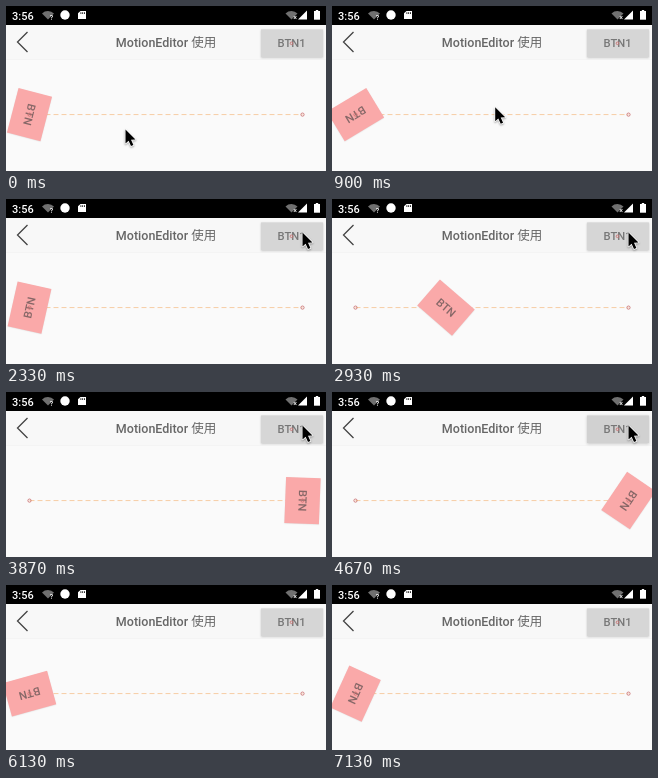
Recreate the animation shown at these times as an HTML page with a canvas. Size 320 px wide and 165 px high, loop 7.16 s.

```html
<!DOCTYPE html>
<html lang="zh">
<head>
<meta charset="utf-8">
<title>MotionEditor 使用</title>
<style>
html, body { margin: 0; width: 100%; height: 100%; overflow: hidden; background: #fafafa; }
canvas { display: block; width: 320px; height: 165px; }
</style>
</head>
<body>
<canvas id="stage"></canvas>
<script>
const LOOP = 7160, LEFT = 23.5, RIGHT = 296.5, TRACK = 108.6;
const GO = 2560, BACK = 4740, TRAVEL = 950;
const FONT = 'Roboto, "Noto Sans CJK SC", "Noto Sans CJK", sans-serif';
const canvas = document.getElementById('stage');
const c = canvas.getContext('2d');
const dpr = window.devicePixelRatio || 1;
canvas.width = 320 * dpr;
canvas.height = 165 * dpr;

const ramp = (t, start, length) => Math.max(0, Math.min(1, (t - start) / length));
const smooth = v => (1 - Math.cos(Math.PI * v)) / 2;

function rect(x, y, w, h, fill) {
  c.fillStyle = fill;
  c.fillRect(x, y, w, h);
}

function box(x, y, w, h, fill, blur, alpha) {
  c.save();
  c.shadowColor = `rgba(0,0,0,${alpha})`;
  c.shadowBlur = blur * dpr;
  c.shadowOffsetY = 0.5 * dpr;
  rect(x, y, w, h, fill);
  c.restore();
}

function polygon(points, fill) {
  c.beginPath();
  points.forEach(([x, y]) => c.lineTo(x, y));
  c.closePath();
  c.fillStyle = fill;
  c.fill();
}

function line(points, color, width) {
  c.beginPath();
  points.forEach(([x, y]) => c.lineTo(x, y));
  c.strokeStyle = color;
  c.lineWidth = width;
  c.stroke();
}

function text(str, x, y, size, color, align = 'center') {
  c.font = `500 ${size}px ${FONT}`;
  c.textAlign = align;
  c.fillStyle = color;
  c.fillText(str, x, y);
}

function ring(x, y, r) {
  c.beginPath();
  c.arc(x, y, r, 0, Math.PI * 2);
  c.strokeStyle = '#cc7474';
  c.lineWidth = 0.9;
  c.stroke();
}

function wifi(x, mark) {
  c.beginPath();
  c.moveTo(x, 13.5);
  c.arc(x, 13.5, 8.5, -Math.PI * 0.75, -Math.PI * 0.25);
  c.fillStyle = '#707070';
  c.fill();
  text(mark, x + 3.5, 13.7, 7, '#fff');
}

function statusBar() {
  rect(0, 0, 320, 19, '#000');
  text('3:56', 6, 13.5, 11, '#fff', 'left');
  wifi(42, '?');
  c.beginPath();
  c.arc(59, 9, 4.7, 0, Math.PI * 2);
  c.fillStyle = '#fff';
  c.fill();
  polygon([[74.5, 5], [80, 5], [80, 13], [72, 13], [72, 7.3]], '#fff');
  for (let i = 0; i < 3; i++) rect(74.5 + i * 1.8, 6.2, 0.8, 1.8, '#000');
  wifi(285.5, '×');
  polygon([[301, 4.5], [301, 13.5], [292, 13.5]], '#fff');
  rect(308, 5, 6, 8.7, '#fff');
  rect(309.8, 4, 2.4, 1, '#fff');
}

function toolbar(t) {
  rect(0, 19, 320, 34, '#f8f8f8');
  rect(0, 53, 320, 1, '#f4f4f4');
  line([[21.5, 26], [11.5, 36], [21.5, 46]], '#444', 1.3);
  text('MotionEditor 使用', 160, 40.5, 12.5, '#666');

  const press = [GO, BACK].reduce((sum, s) =>
    sum + ramp(t, s - 100, 80) * (1 - ramp(t, s + 50, 260)), 0);
  const shade = Math.round(214 - 14 * press);
  box(255, 23.5, 62, 27.5, `rgb(${shade},${shade},${shade})`, 2 + 2 * press, 0.2);
  text('BTN1', 285.5, 41, 11.2, '#777');
  ring(285.5, 37.3, 1.3);
}

function track() {
  c.save();
  c.setLineDash([5, 3]);
  line([[LEFT, TRACK], [RIGHT, TRACK]], '#f7cda4', 1);
  c.restore();
}

// Steady spin with one short stall, plus a turn that follows the travel
function button(t) {
  const travel = smooth(ramp(t, GO, TRAVEL)) - smooth(ramp(t, BACK, TRAVEL));
  const spun = t - 130 * ramp(t, 740, 130);
  const angle = 105 - 0.41 * spun + 81 * smooth(ramp(travel, 0.25, 0.55));
  c.save();
  c.translate(LEFT + (RIGHT - LEFT) * travel, TRACK);
  c.rotate(angle * Math.PI / 180);
  box(-23, -17.3, 46, 34.6, '#faa9a9', 1.2, 0.1);
  text('BTN', 0, 4, 11.2, '#866767');
  c.restore();
}

function pointer(t) {
  const arrive = smooth(ramp(t, 560, 1030));
  const leave = ramp(t, 5200, 330);
  c.save();
  c.translate(119 + 177 * arrive - 57 * leave, 123 - 90 * arrive + 138 * leave);
  c.lineJoin = 'round';
  c.shadowColor = 'rgba(0,0,0,0.35)';
  c.shadowBlur = 2 * dpr;
  c.shadowOffsetY = dpr;
  const arrow = [[0.5, 0.5], [0.5, 14.5], [3.6, 11.7], [6, 17], [8.4, 16],
                 [6, 10.8], [10.5, 10.5], [0.5, 0.5]];
  line(arrow, '#fff', 1.6);
  c.shadowColor = 'transparent';
  polygon(arrow, '#000');
  c.restore();
}

function draw(t) {
  c.setTransform(dpr, 0, 0, dpr, 0, 0);
  rect(0, 0, 320, 165, '#fafafa');
  statusBar();
  toolbar(t);
  track();
  button(t);
  ring(LEFT, TRACK, 1.6);
  ring(RIGHT, TRACK, 1.6);
  pointer(t);
}

const start = performance.now();
function frame() {
  draw((performance.now() - start) % LOOP);
  requestAnimationFrame(frame);
}
frame();
</script>
</body>
</html>
```
